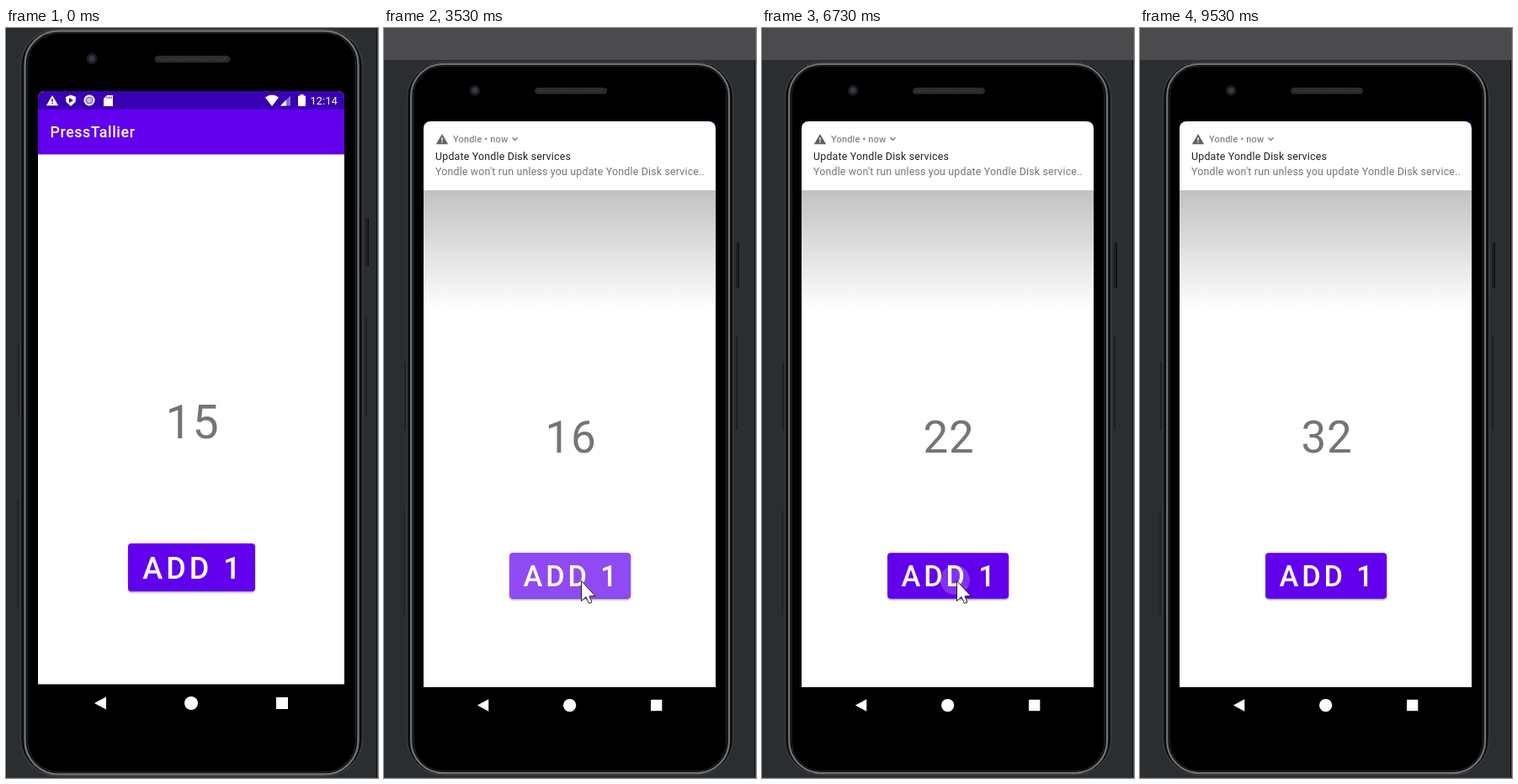
Write an HTML page with a canvas that moves like this. It is 442 by 892 pixels and loops after 9590 ms.

```html
<!DOCTYPE html>
<html lang="en">
<head>
<meta charset="utf-8">
<title>Tap counter</title>
<style>
html, body { margin: 0; width: 100%; height: 100%; overflow: hidden; background: #2a2e30; }
canvas { display: block; }
</style>
</head>
<body>
<canvas id="stage" width="442" height="892"></canvas>
<script>
const ctx = document.getElementById('stage').getContext('2d');
const LOOP = 9590, ZOOM_AT = 2600, NOTE_AT = 2930, HIDE_AT = 8800;
const SCALE = 0.954;
const CLICKS = [3380, 3950, 4420, 4880, 5640, 6110, 6670, 6860, 7050, 7230, 7410, 7600,
  7830, 8050, 8270, 8490, 8700];
const FONT = 'Roboto, sans-serif';

const clamp = v => Math.max(0, Math.min(1, v));
const ramp = (t, a, b) => clamp((t - a) / (b - a));
const easeOut = v => 1 - (1 - v) ** 3;
const mix = (a, b, k) => a + (b - a) * k;

function rect(x, y, w, h, color) {
  ctx.fillStyle = color;
  ctx.fillRect(x, y, w, h);
}

function round(x, y, w, h, r, fill, stroke, width = 1) {
  ctx.beginPath();
  ctx.roundRect(x, y, w, h, r);
  if (fill) { ctx.fillStyle = fill; ctx.fill(); }
  if (stroke) { ctx.strokeStyle = stroke; ctx.lineWidth = width; ctx.stroke(); }
}

function disc(x, y, r, color) {
  ctx.beginPath();
  ctx.arc(x, y, r, 0, 7);
  ctx.fillStyle = color;
  ctx.fill();
}

function poly(points, color) {
  ctx.beginPath();
  for (const [x, y] of points) ctx.lineTo(x, y);
  ctx.closePath();
  ctx.fillStyle = color;
  ctx.fill();
}

function text(str, x, y, size, color, weight = 400, spacing = 0) {
  ctx.font = `${weight} ${size}px ${FONT}`;
  ctx.letterSpacing = spacing + 'px';
  ctx.fillStyle = color;
  ctx.fillText(str, x, y);
}

function warning(x, y, r, color, mark) {
  poly([[x, y - r], [x + r * 1.1, y + r * 0.9], [x - r * 1.1, y + r * 0.9]], color);
  rect(x - 0.7, y - r * 0.35, 1.4, r * 0.6, mark);
  rect(x - 0.7, y + r * 0.4, 1.4, 1.4, mark);
}

function drawBody() {
  // side keys
  rect(427, 226, 4, 57, '#1c1f21');
  rect(427, 343, 2, 117, '#1c1f21');
  rect(430, 226, 1, 57, '#0a0b0c');
  rect(14, 375, 2, 85, '#1f2224');
  rect(13, 560, 2, 130, '#222527');

  round(17.5, 1.5, 406, 888, 44, '#0c0d0e', '#3a3c3e', 1.5);
  round(22.5, 3.5, 396, 884, 40, '#000', '#707276', 2.4);
  round(25.5, 6, 390, 879, 37, '#000', '#1f2022', 1.5);

  disc(102, 36.5, 6.5, '#1d1d20');
  disc(102, 36.5, 3.5, '#38384a');
  round(177, 33.5, 89, 7, 3.5, '#292929', '#383838', 0.8);
  for (let i = 0; i < 27; i++) rect(181 + i * 3, 35.5 + i % 2, 1.5, 2, '#424242');

  poly([[105, 803], [119, 795.5], [119, 810.5]], '#fff');
  disc(220, 803, 8, '#fff');
  rect(321, 796, 14, 14, '#fff');
}

function drawStatus() {
  rect(38, 75, 364, 22, '#3a00b3');
  warning(55, 86.5, 6.5, '#fff', '#3a00b3');
  poly([[77, 79.5], [83, 82], [82.5, 88], [77, 93], [71.5, 88], [71, 82]], '#fff');
  poly([[75, 83], [80, 86], [75, 89]], '#3a00b3');
  disc(99, 86, 6.5, '#fff');
  disc(99, 86, 4.6, '#8b69d4');
  disc(99, 86, 3, '#c9b8ee');
  poly([[120, 80], [127, 80], [127, 93], [116, 93], [116, 84]], '#fff');
  for (const x of [119.5, 122, 124.5]) rect(x, 81.5, 1, 2.5, '#3a00b3');

  ctx.beginPath();
  ctx.moveTo(316, 93);
  ctx.lineTo(308, 82.5);
  ctx.quadraticCurveTo(316, 76.5, 324, 82.5);
  ctx.fillStyle = '#fff';
  ctx.fill();
  poly([[326, 92.5], [338, 80.5], [338, 92.5]], '#8767cf');
  poly([[326, 92.5], [333, 85.5], [333, 92.5]], '#fff');
  rect(349.5, 79, 4, 2, '#fff');
  round(347, 80.5, 9, 12.5, 1, '#fff');
  text('12:14', 361.5, 91, 12.5, '#fff', 400, 0.3);
}

function drawButton(t) {
  let glow = 0, lift = 0;
  for (const c of CLICKS) {
    const d = t - c;
    glow = Math.max(glow, 0.29 * ramp(d, 70, 150) * (1 - ramp(d, 230, 600)));
    lift = Math.max(lift, ramp(d, 150, 250) * (1 - ramp(d, 350, 500)));
  }
  ctx.save();
  ctx.shadowColor = 'rgba(0,0,0,.35)';
  ctx.shadowBlur = 2 + 6 * lift;
  ctx.shadowOffsetY = 1.5 + 4 * lift;
  round(145, 613, 151, 57, 4, '#6200ee');
  ctx.restore();

  ctx.save();
  ctx.beginPath();
  ctx.roundRect(145, 613, 151, 57, 4);
  ctx.clip();
  rect(145, 613, 151, 57, `rgba(255,255,255,${glow})`);
  for (const c of CLICKS) {
    const d = t - c, alpha = 0.2 * (1 - ramp(d, 130, 150));
    if (d < 20 || !alpha) continue;
    const k = ramp(d, 40, 150);
    disc(mix(231, 221, k), mix(648, 641.5, k), (0.37 * d - 5) / SCALE, `rgba(255,255,255,${alpha})`);
  }
  ctx.restore();
  text('ADD 1', 162.3, 655, 36, '#fff', 500, 4);
}

function drawNote(t) {
  const k = easeOut(ramp(t, NOTE_AT, NOTE_AT + 350));
  if (!k) return;
  ctx.save();
  ctx.beginPath();
  ctx.roundRect(47, 111, 347, 673, [8, 8, 0, 0]);
  ctx.clip();
  const shade = ctx.createLinearGradient(0, 111, 0, 330);
  shade.addColorStop(0, `rgba(0,0,0,${0.38 * k})`);
  shade.addColorStop(1, 'rgba(0,0,0,0.01)');
  rect(47, 111, 347, 219, shade);
  ctx.translate(0, -82 * (1 - k));
  // the card fully hides the bars behind it
  round(47, 111, 347, 82, [8, 8, 0, 0], '#fff');
  warning(69, 132.5, 6.5, '#616161', '#fff');
  text('Yondle • now', 82, 136, 11, '#6b6b6b', 400, 0.2);
  ctx.beginPath();
  ctx.moveTo(152.5, 130.5);
  ctx.lineTo(155.5, 133.5);
  ctx.lineTo(158.5, 130.5);
  ctx.strokeStyle = '#6b6b6b';
  ctx.lineWidth = 1.2;
  ctx.stroke();
  text('Update Yondle Disk services', 61, 157, 12.4, '#212121', 400, 0.2);
  text("Yondle won't run unless you update Yondle Disk service..", 61, 175, 12.4, '#757575', 400, 0.18);
  ctx.restore();
}

function drawCursor(t) {
  if (t < 1930 || t >= HIDE_AT) return;
  const k = easeOut(ramp(t, 1930, 2360));
  let x = mix(300, 216, k), y = mix(740, 643, k);
  if (t >= ZOOM_AT) {
    x = mix(234.5, 231.5, ramp(t, 4900, 5100));
    y = 657.5;
  }
  ctx.save();
  ctx.translate(x, y);
  poly([[0, 0], [0, 24], [5.5, 19], [9, 27], [12.5, 25.5], [9.5, 18.3], [16.5, 18]], '#fff');
  ctx.strokeStyle = '#222';
  ctx.lineWidth = 1;
  ctx.stroke();
  ctx.restore();
}

function draw(t) {
  const zoomed = t >= ZOOM_AT;
  rect(0, 0, 442, 892, '#2a2e30');
  ctx.save();
  if (zoomed) {
    rect(0, 0, 442, 38, '#4b4a4c');
    ctx.translate(47 - 38 * SCALE, 111 - 75 * SCALE);
    ctx.scale(SCALE, SCALE);
  }
  drawBody();

  ctx.save();
  ctx.beginPath();
  ctx.roundRect(38, 75, 364, 705.5, [8, 8, 0, 0]);
  ctx.clip();
  rect(38, 75, 364, 706, '#fff');
  drawStatus();
  rect(38, 97, 364, 53, '#6200ee');
  rect(38, 150, 364, 1, '#b9a9d3');
  text('PressTallier', 52.5, 130, 17.8, '#fff', 500, 0.6);
  ctx.textAlign = 'center';
  const count = 15 + CLICKS.filter(c => t >= c).length;
  text(count, 221.5, 487.5, 55.5, '#757575', 400, 0.8);
  ctx.textAlign = 'left';
  drawButton(t);
  ctx.restore();
  ctx.restore();

  drawNote(t);
  rect(440, zoomed ? 38 : 0, 1, 892, '#0c0d0e');
  rect(441, 0, 1, 892, '#55585a');
  rect(0, 891, 442, 1, '#3a3d3f');
  drawCursor(t);
}

const start = performance.now();
function tick() {
  draw((performance.now() - start) % LOOP);
  requestAnimationFrame(tick);
}
tick();
</script>
</body>
</html>
```
